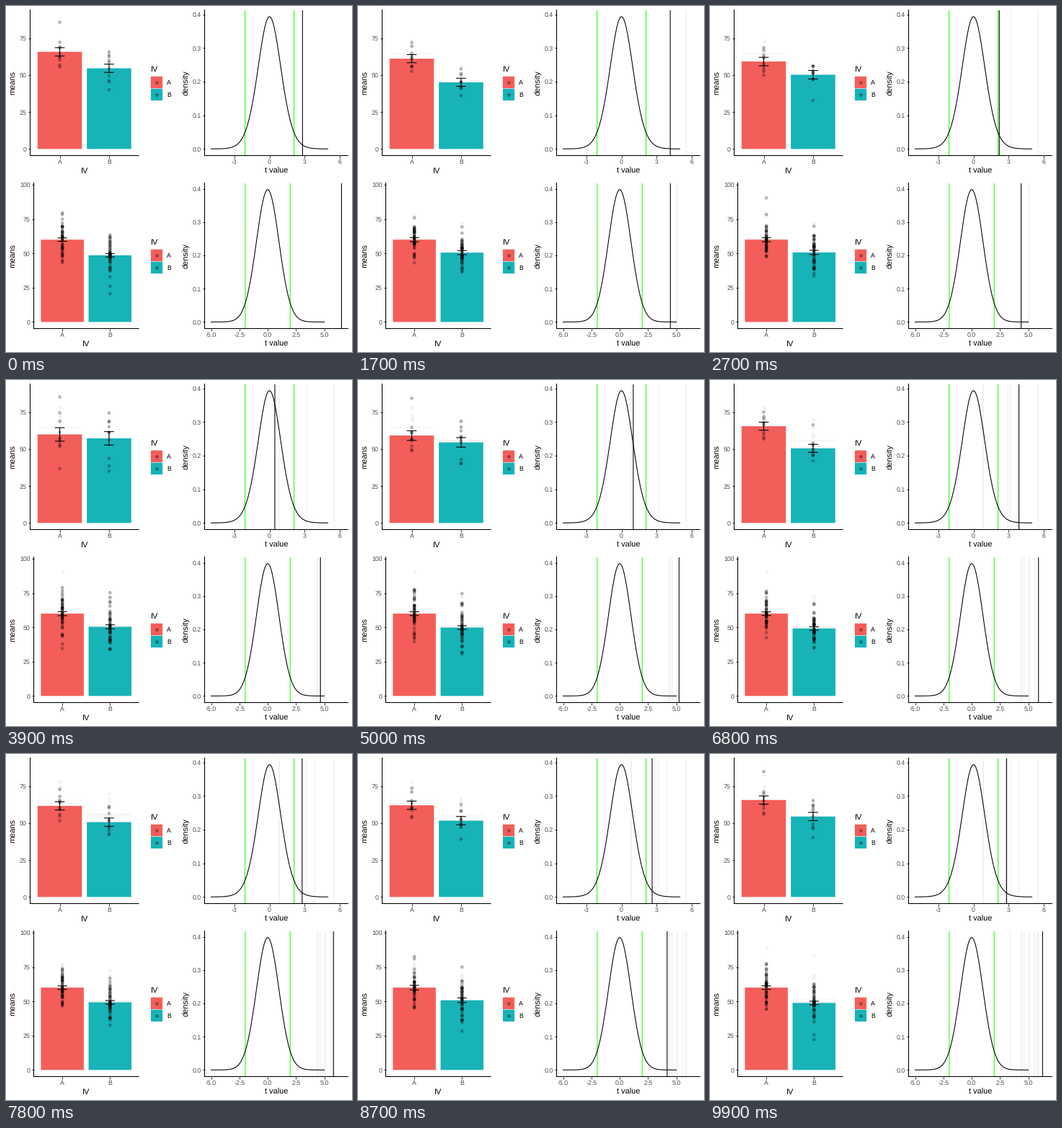
A matplotlib script that plays this animation: 480x480 px, repeating every 10000 ms.

```python
import math

import matplotlib.pyplot as plt
import numpy as np
from matplotlib.animation import FuncAnimation
from matplotlib.patches import Rectangle

SIZE, DPI = 480, 72
RED, TEAL, GREEN = "#F35E5A", "#17B3B7", "#21FF06"
FAINT = "#f1f1f1"
LW = 1.07
HEIGHT = 202
FRAMES = 100
MARKS = range(8, FRAMES, 10)  # late in each move, a faint trace stays behind

plt.rcParams.update({
    "font.family": "Liberation Sans", "axes.unicode_minus": False,
    "path.snap": False, "text.hinting": "none"})
fig = plt.figure(figsize=(SIZE / DPI, SIZE / DPI), dpi=DPI, facecolor="white")


def tween(states, i):
    """Hold each state, then ease (sine in-out) into the next one."""
    k, j = divmod(i, 10)
    hold, steps = (3, 7) if k == 0 else (4, 6)
    p = max(0, (j - hold) / steps)
    e = (1 - math.cos(math.pi * p)) / 2
    return states[k] * (1 - e) + states[(k + 1) % len(states)] * e


def simulate(rng, n, t, mean_a, base, slope):
    """Draw both groups for every t value; the gap between them grows with t."""
    gap = base + slope * t
    se = gap / (t * math.sqrt(2))
    means = np.stack([mean_a + 0 * t, mean_a - gap], axis=1)
    z = rng.normal(size=(len(t), 2, n))
    z -= z.mean(axis=2, keepdims=True)
    z /= z.std(axis=2, ddof=1, keepdims=True)
    return means, se, means[..., None] + z * (se * math.sqrt(n))[:, None, None]


def t_density(x, df):
    c = math.gamma((df + 1) / 2) / (math.sqrt(df * math.pi) * math.gamma(df / 2))
    return c * (1 + x * x / df) ** (-(df + 1) / 2)


def label(x, y, text, size=11, ha="left", rotation=0):
    fig.text(x / SIZE, 1 - y / SIZE, text, size=size, ha=ha, va="baseline",
             rotation=rotation, rotation_mode="anchor", color="black")


def panel(x0, x1, top, xlim, ymax, xlabel, ylabel, title_x):
    bottom = top + HEIGHT
    ax = fig.add_axes([x0 / SIZE, 1 - bottom / SIZE,
                       (x1 - x0) / SIZE, HEIGHT / SIZE])
    ax.set(xlim=xlim, ylim=(-0.05 * ymax, 1.05 * ymax), facecolor="none")
    ax.spines[["top", "right"]].set_visible(False)
    ax.spines[["left", "bottom"]].set_linewidth(LW)
    ax.tick_params(length=2.75, width=LW, pad=2.2, color="#333333",
                   labelcolor="#4d4d4d", labelsize=8.8)
    label((x0 + x1) / 2, bottom + 24.4, xlabel, ha="center")
    label(title_x, top + HEIGHT / 2, ylabel, ha="center", rotation=90)
    return ax


def legend(top):
    label(200.5, top + 85.5, "IV")
    for n, (name, color) in enumerate((("A", RED), ("B", TEAL))):
        y = top + 92.2 + 17 * n
        fig.add_artist(Rectangle((200.9 / SIZE, 1 - (y + 16.4) / SIZE),
                                 16.2 / SIZE, 16.4 / SIZE, color=color, lw=0))
        fig.add_artist(plt.Line2D([209 / SIZE], [1 - (y + 8.3) / SIZE], marker="o",
                                  ms=3.9, mew=0.7, color="black", alpha=0.3))
        label(222.8, y + 11.6, name, 8.8)


class Study:
    """One row: bar chart of two groups and the matching t distribution."""

    def __init__(self, top, left, n, t, sample, ymax, crit, xticks, tick_format):
        self.t = np.array(t)
        self.means, self.se, self.points = sample(n, self.t)
        self.draw_groups(top, left, n, ymax)
        self.draw_density(top, 2 * n - 2, crit, xticks, tick_format)

    def draw_groups(self, top, left, n, ymax):
        ax = panel(left, 184, top, (0.4, 2.6), ymax, "IV", "means", 13.4)
        ax.set_xticks([1, 2], ["A", "B"])
        ax.set_yticks(np.arange(0, 1.05 * ymax, 25))
        self.old_tops = ax.plot([], [], color=FAINT, lw=1, zorder=1)[0]
        self.old_dots = ax.plot([], [], "o", ms=4.6, mew=0, color=FAINT, zorder=1)[0]
        self.bars = ax.bar([1, 2], [0, 0], 0.9, color=[RED, TEAL], zorder=2)
        self.dot_x = np.repeat([1, 2], n)
        self.dots = ax.scatter(self.dot_x, 0 * self.dot_x, s=3.9 ** 2, lw=0.7,
                               color=["black"] * (2 * n), alpha=0.25, zorder=3)
        self.errors = ax.plot([], [], color="black", lw=LW, zorder=4,
                              solid_capstyle="butt")[0]
        legend(top)

    def draw_density(self, top, df, crit, xticks, tick_format):
        tmax = self.t.max()
        pad = 0.05 * (tmax + 5)
        ax = panel(275.5, 474.5, top, (-5 - pad, tmax + pad), t_density(0, df),
                   "t value", "density", 253.4)
        ax.set_xticks(xticks, [format(v, tick_format) for v in xticks])
        ax.set_yticks(np.arange(5) / 10)
        x = np.linspace(-5, 5, 101)
        ax.plot(x, t_density(x, df), color="black", lw=LW, zorder=3)
        for v in (-crit, crit):
            ax.axvline(v, color=GREEN, lw=LW, zorder=2)
        self.t_line = ax.axvline(0, color="black", lw=LW, zorder=4)
        self.old_lines = [ax.axvline(tween(self.t, m), color=FAINT, lw=1.4, zorder=1)
                          for m in MARKS]

    def draw(self, i):
        means, se = tween(self.means, i), tween(self.se, i)
        xs, ys = [], []
        for x, mean, bar in zip((1, 2), means, self.bars):
            bar.set_height(mean)
            lo, hi, gap = mean - se, mean + se, math.nan
            xs += [x - .1, x + .1, gap, x, x, gap, x - .1, x + .1, gap]
            ys += [lo, lo, gap, lo, hi, gap, hi, hi, gap]
        self.errors.set_data(xs, ys)
        self.dots.set_offsets(np.column_stack(
            [self.dot_x, tween(self.points, i).ravel()]))
        self.t_line.set_xdata([tween(self.t, i)] * 2)
        self.draw_trail(i)

    def draw_trail(self, i):
        """Faint traces of earlier moments."""
        for m, line in zip(MARKS, self.old_lines):
            line.set_visible(m < i)
        top_x, top_y, dot_x, dot_y = [], [], [], []
        for m in (m for m in MARKS if m < i <= m + 42):
            for x, mean, values in zip((1, 2), tween(self.means, m),
                                       tween(self.points, m)):
                top_x += [x - 0.45, x + 0.45, math.nan]
                top_y += [mean, mean, math.nan]
                dot_x.append(x)
                dot_y.append(values.max())
        self.old_tops.set_data(top_x, top_y)
        self.old_dots.set_data(dot_x, dot_y)


rng = np.random.default_rng(7)
small_means = np.array([65.9, 64.5, 58, 60.6, 60, 59.3, 64.5, 66, 60.4, 64])

studies = [
    Study(5.5, 33.5, 10,
          [2.83, 6.17, 2.18, 2.24, 0.33, 1.01, 3.60, 3.99, 2.40, 2.85],
          lambda n, t: simulate(rng, n, t, small_means, 1, 3.6),
          89.8, 2.101, [-3, 0, 3, 6], "d"),
    Study(245.5, 38.5, 50,
          [6.52, 4.70, 4.25, 4.48, 4.67, 5.24, 5.69, 5.97, 5.75, 2.63],
          lambda n, t: simulate(rng, n, t, 60, 5.2, 0.95),
          96.5, 1.984, [-5, -2.5, 0, 2.5, 5], ".1f"),
]


def update(i):
    for study in studies:
        study.draw(i)
    return []


anim = FuncAnimation(fig, update, frames=FRAMES, interval=100, repeat=True,
                     repeat_delay=0, blit=False)
plt.show()
```
